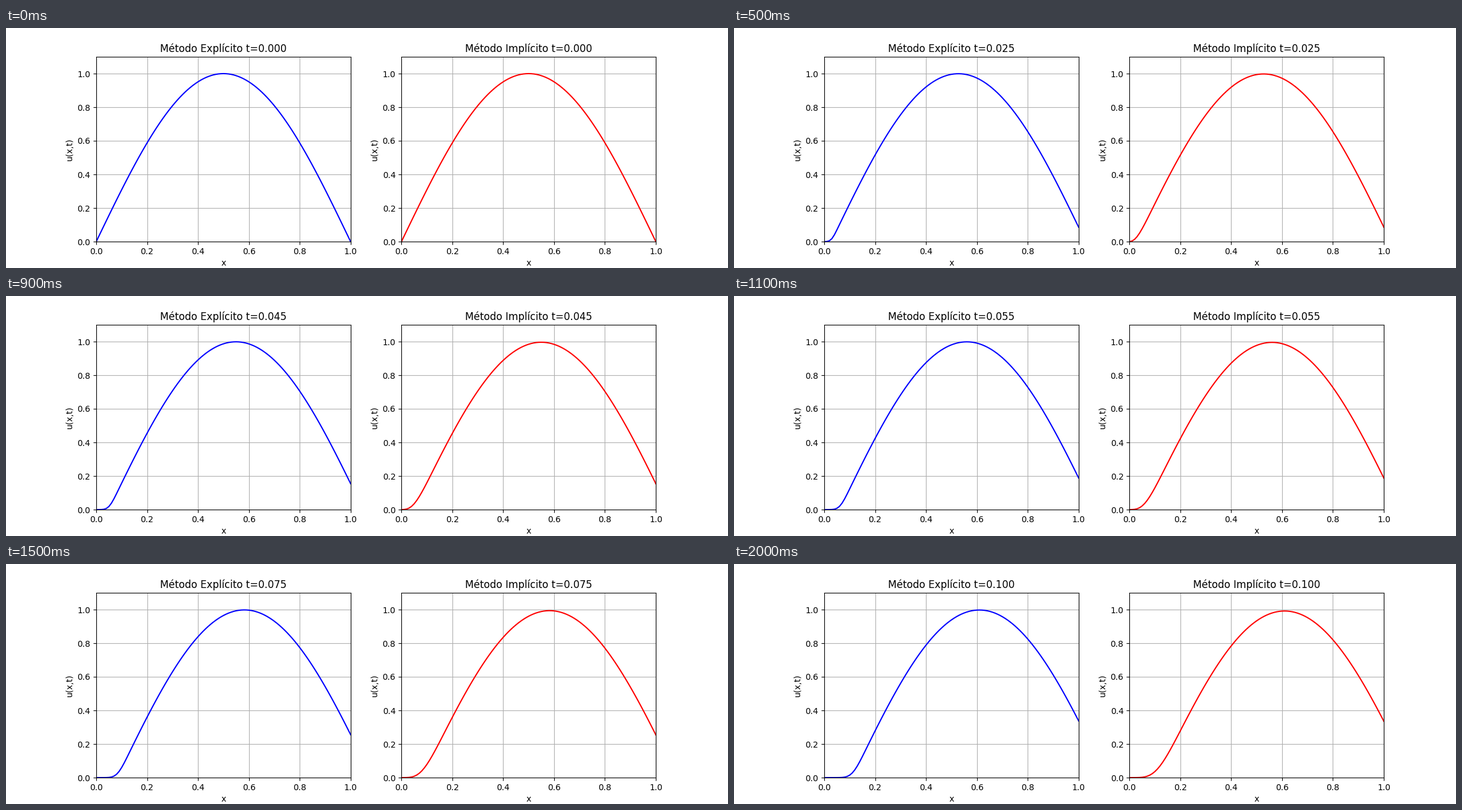
Recreate the animation shown at these times as a matplotlib script. Size 1200 px wide and 400 px high, loop 2100 ms.

```python
import numpy as np
import matplotlib.pyplot as plt
from matplotlib.animation import FuncAnimation

plt.rcParams["font.family"] = "DejaVu Sans"

# Advection u_t + C u_x = 0 on [0, 1], first-order upwind
C, DX, DT = 1.1, 0.01, 0.005
STEPS = 20
R = C * DT / DX
x = np.linspace(0, 1, 101)


def explicit_step(u):
    new = u.copy()
    new[1:] = u[1:] - R * (u[1:] - u[:-1])
    new[0] = 0
    return new


def implicit_step(u):
    new = np.zeros_like(u)
    for i in range(1, len(u)):
        new[i] = (u[i] + R * new[i - 1]) / (1 + R)
    return new


def solve(step):
    states = [np.sin(np.pi * x)]
    for _ in range(STEPS):
        states.append(step(states[-1]))
    return states


fig, axes = plt.subplots(1, 2, figsize=(12, 4), dpi=100)


def make_panel(ax, name, color, step):
    ax.set_xlim(0, 1)
    ax.set_ylim(0, 1.1)
    ax.set_xlabel("x")
    ax.set_ylabel("u(x,t)")
    ax.grid(True)
    states = solve(step)
    line, = ax.plot(x, states[0], color=color)
    return ax, name, line, states


panels = [
    make_panel(axes[0], "Método Explícito", "blue", explicit_step),
    make_panel(axes[1], "Método Implícito", "red", implicit_step),
]


def update(n):
    for ax, name, line, states in panels:
        line.set_ydata(states[n])
        ax.set_title(f"{name} t={n * DT:.3f}")
    return [panel[2] for panel in panels]


anim = FuncAnimation(fig, update, frames=STEPS + 1, interval=100,
                     init_func=lambda: update(0), blit=False, repeat=True)
plt.show()
```
